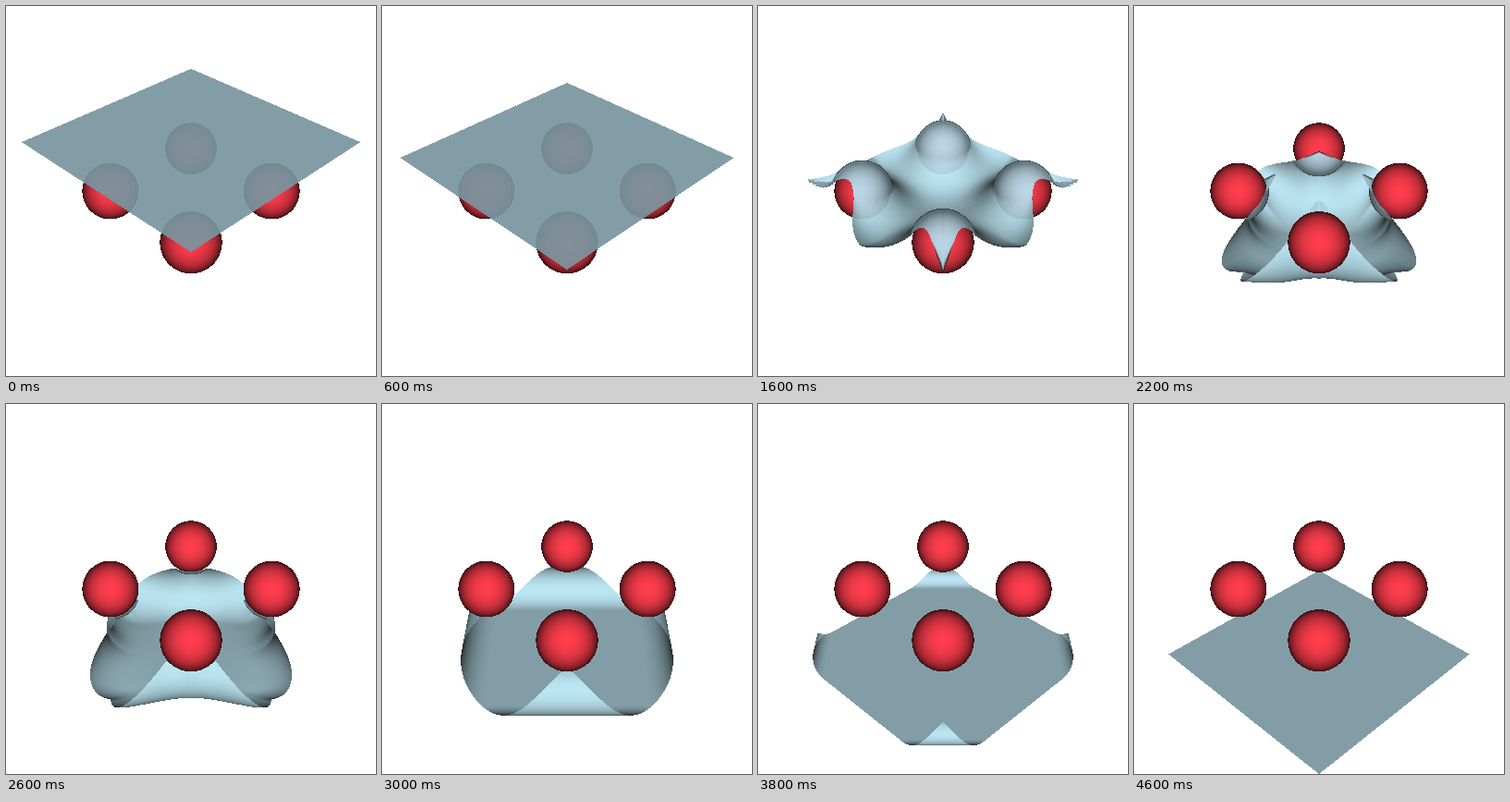
An HTML page with a canvas that plays this animation: 400x400 px, repeating every 8 s.

```html
<!DOCTYPE html>
<html>
<head>
<meta charset="utf-8">
<style>
html, body { margin: 0; height: 100%; overflow: hidden; background: #fff; }
canvas { display: block; width: 100vw; height: 100vh; }
</style>
</head>
<body>
<canvas id="stage" width="400" height="400"></canvas>
<script>
const SIZE = 400, LOOP = 8000, STEP = 100, LAST = 46;
const N = 84, ROW = N + 1;                 // cloth grid
const HALF = 2 * Math.SQRT2;               // half diagonal of the cloth
const SIN = Math.sqrt(1 / 3), COS = Math.sqrt(2 / 3), DIST = 12.1, FOCAL = 746;
const CLOTH = [173, 216, 230], BALL = [255, 61, 77], ALPHA = 0.92;
const RING = Math.SQRT2, RADIUS = 0.5;
const BALLS = [[0, -RING], [-RING, 0], [RING, 0], [0, RING]];

const ctx = document.getElementById('stage').getContext('2d');
const image = ctx.createImageData(SIZE, SIZE);
const ballDepth = new Float32Array(SIZE * SIZE).fill(1e9);
const ballShade = new Float32Array(SIZE * SIZE);
const depth = new Float32Array(SIZE * SIZE);
const shade = new Float32Array(SIZE * SIZE);

const clamp = (v, a = 0, b = 1) => Math.min(b, Math.max(a, v));
const mix = (a, b, f) => a + (b - a) * f;
const smooth = f => f * f * (3 - 2 * f);

// piecewise linear value through [time, value] pairs
function key(t, pairs) {
  let [t0, v0] = pairs[0];
  for (const [t1, v1] of pairs) {
    if (t < t1) return t <= t0 ? v0 : mix(v0, v1, (t - t0) / (t1 - t0));
    [t0, v0] = [t1, v1];
  }
  return v0;
}

// s: 0 at the centre, 1 at the hem; c: 0 at the middle of a side, 1 at a corner
function spot(X, Z) {
  const ax = Math.abs(X), az = Math.abs(Z), sum = ax + az;
  return [sum / HALF, sum ? Math.abs(ax - az) / sum : 0];
}

function project([x, y, z]) {
  const d = DIST - y * SIN - z * COS;
  return [SIZE / 2 + FOCAL * x / d, SIZE / 2 - FOCAL * (y * COS - z * SIN) / d, d];
}

function paintBalls() {
  for (const [x, z] of BALLS) {
    const [cx, cy, d] = project([x, 0, z]);
    const r = FOCAL * 0.493 / d;
    for (let py = Math.floor(cy - r); py <= cy + r; py++)
      for (let px = Math.floor(cx - r); px <= cx + r; px++) {
        const q = ((px + 0.5 - cx) ** 2 + (py + 0.5 - cy) ** 2) / (r * r);
        if (q > 1) continue;
        const n = Math.sqrt(1 - q), i = py * SIZE + px;
        if (d - RADIUS * n < ballDepth[i]) {
          ballDepth[i] = d - RADIUS * n;
          ballShade[i] = 0.08 + 0.92 * n;
        }
      }
  }
}

// falling sheet that catches on the balls and sags between them
function drape(X, Z, t) {
  const held = Math.min(t, 1.7);
  const fall = 1 - 0.86 * held * held;
  const [s, c] = spot(X, Z);
  const shrink = 0.19 * Math.max(0, held - 0.8) * (0.4 + 0.6 * c);
  const pinch = 0.5 * Math.max(0, held - 1.1) * s * s * 6.75 * c * c * (1 - c);
  const scale = (1 - shrink) * (1 - pinch);
  const x = X * scale, z = Z * scale;
  const rim = Math.max(fall, -0.17 + 0.4 * c);
  let y = mix(Math.max(fall, -0.85), rim, s ** 2.3);
  for (const [bx, bz] of BALLS) {
    const d = Math.hypot(x - bx, z - bz);
    if (d < 0.37) y = Math.max(y, Math.sqrt(0.275 - d * d));
    else if (y < 0.37) y = mix(y, 0.37, Math.exp((0.37 - d) / (0.22 + 0.35 * Math.max(0, -y))));
  }
  y += 0.6 * s ** 8 * c * Math.max(0, 1 - Math.abs(t - 1.8) / 0.2);
  return [x, y, z];
}

// sheet lying on the floor with its four corners rolled inwards
function rolled(X, Z, t) {
  const k = key(t, [[2.2, 0.45], [2.7, 1.05], [3, 1.38], [3.6, 1.97], [4.6, HALF]]);
  const R = (HALF - k) * key(t, [[2.2, 0.38], [2.7, 0.335]]);
  const floor = key(t, [[2.2, -1.34], [2.5, -1.5]]);
  const slack = key(t, [[2.2, 1], [3, 0]]);
  const [s, c] = spot(X, Z);
  const bulge = 1 + 0.2 * slack * s ** 3 * Math.sin(1.7 * Math.PI * c);
  const droop = 0.35 * slack * (X * Z / 2) ** 2;
  const curl = a => {
    const w = Math.abs(a) - k;
    if (w <= 0 || R < 1e-6) return [a, 0];
    return [Math.sign(a) * (k + R * Math.sin(w / R)), R * (1 - Math.cos(w / R))];
  };
  const [x, hx] = curl(X), [z, hz] = curl(Z);
  return [x * bulge, floor + hx + hz - droop, z * bulge];
}

function place(X, Z, t) {
  const f = smooth(clamp((t - 1.6) / 0.6));
  let p = f < 1 ? drape(X, Z, t) : rolled(X, Z, t);
  if (f > 0 && f < 1) {
    const q = rolled(X, Z, t);
    p = p.map((v, i) => mix(v, q[i], f));
  }
  for (const [bx, bz] of BALLS) {
    const d = Math.hypot(p[0] - bx, p[1], p[2] - bz) || 1e-6;
    const g = 0.54 / d;
    if (g > 1) p = [bx + (p[0] - bx) * g, p[1] * g, bz + (p[2] - bz) * g];
  }
  return p;
}

// light comes from the viewer and works on both sides
function light(a, b, c, d) {
  const u = b.map((v, i) => v - a[i]), w = d.map((v, i) => v - c[i]);
  const nx = u[1] * w[2] - u[2] * w[1];
  const ny = u[2] * w[0] - u[0] * w[2];
  const nz = u[0] * w[1] - u[1] * w[0];
  const n = Math.abs(ny * SIN + nz * COS) / (Math.hypot(nx, ny, nz) || 1);
  return 0.1 + 0.95 * n ** 0.87;
}

function triangle(a, b, c) {
  const area = (b[0] - a[0]) * (c[1] - a[1]) - (b[1] - a[1]) * (c[0] - a[0]);
  if (Math.abs(area) < 1e-9) return;
  const x0 = Math.max(0, Math.ceil(Math.min(a[0], b[0], c[0]) - 0.5));
  const x1 = Math.min(SIZE - 1, Math.max(a[0], b[0], c[0]) - 0.5);
  const y0 = Math.max(0, Math.ceil(Math.min(a[1], b[1], c[1]) - 0.5));
  const y1 = Math.min(SIZE - 1, Math.max(a[1], b[1], c[1]) - 0.5);
  for (let y = y0; y <= y1; y++)
    for (let x = x0; x <= x1; x++) {
      const px = x + 0.5, py = y + 0.5;
      const wb = ((px - a[0]) * (c[1] - a[1]) - (py - a[1]) * (c[0] - a[0])) / area;
      const wc = ((b[0] - a[0]) * (py - a[1]) - (b[1] - a[1]) * (px - a[0])) / area;
      const wa = 1 - wb - wc;
      if (wa < -1e-6 || wb < -1e-6 || wc < -1e-6) continue;
      const d = wa * a[2] + wb * b[2] + wc * c[2], i = y * SIZE + x;
      if (d < depth[i]) {
        depth[i] = d;
        shade[i] = wa * a[3] + wb * b[3] + wc * c[3];
      }
    }
}

function draw(t) {
  const points = [];
  for (let j = 0; j <= N; j++)
    for (let i = 0; i <= N; i++) {
      const u = 4 * i / N - 2, v = 4 * j / N - 2;
      points.push(place((u + v) / Math.SQRT2, (v - u) / Math.SQRT2, t));
    }
  const at = (i, j) => points[clamp(j, 0, N) * ROW + clamp(i, 0, N)];
  const verts = points.map((p, n) => {
    const i = n % ROW, j = (n - i) / ROW;
    return [...project(p), light(at(i - 1, j), at(i + 1, j), at(i, j - 1), at(i, j + 1))];
  });

  depth.fill(1e8);
  for (let j = 0; j < N; j++)
    for (let i = 0; i < N; i++) {
      const n = j * ROW + i;
      triangle(verts[n], verts[n + 1], verts[n + ROW]);
      triangle(verts[n + 1], verts[n + ROW + 1], verts[n + ROW]);
    }

  for (let i = 0; i < depth.length; i++) {
    const covered = depth[i] < 1e8 && depth[i] < ballDepth[i];
    for (let c = 0; c < 3; c++) {
      let v = ballDepth[i] < 1e9 ? BALL[c] * ballShade[i] : 255;
      if (covered) v = mix(v, Math.min(255, CLOTH[c] * shade[i]), ALPHA);
      image.data[i * 4 + c] = v;
    }
    image.data[i * 4 + 3] = 255;
  }
  ctx.putImageData(image, 0, 0);
}

let shown = -1;
function tick() {
  const step = Math.min(LAST, Math.floor(performance.now() % LOOP / STEP));
  if (step !== shown) draw((shown = step) / 10);
  requestAnimationFrame(tick);
}

paintBalls();
tick();
</script>
</body>
</html>
```
